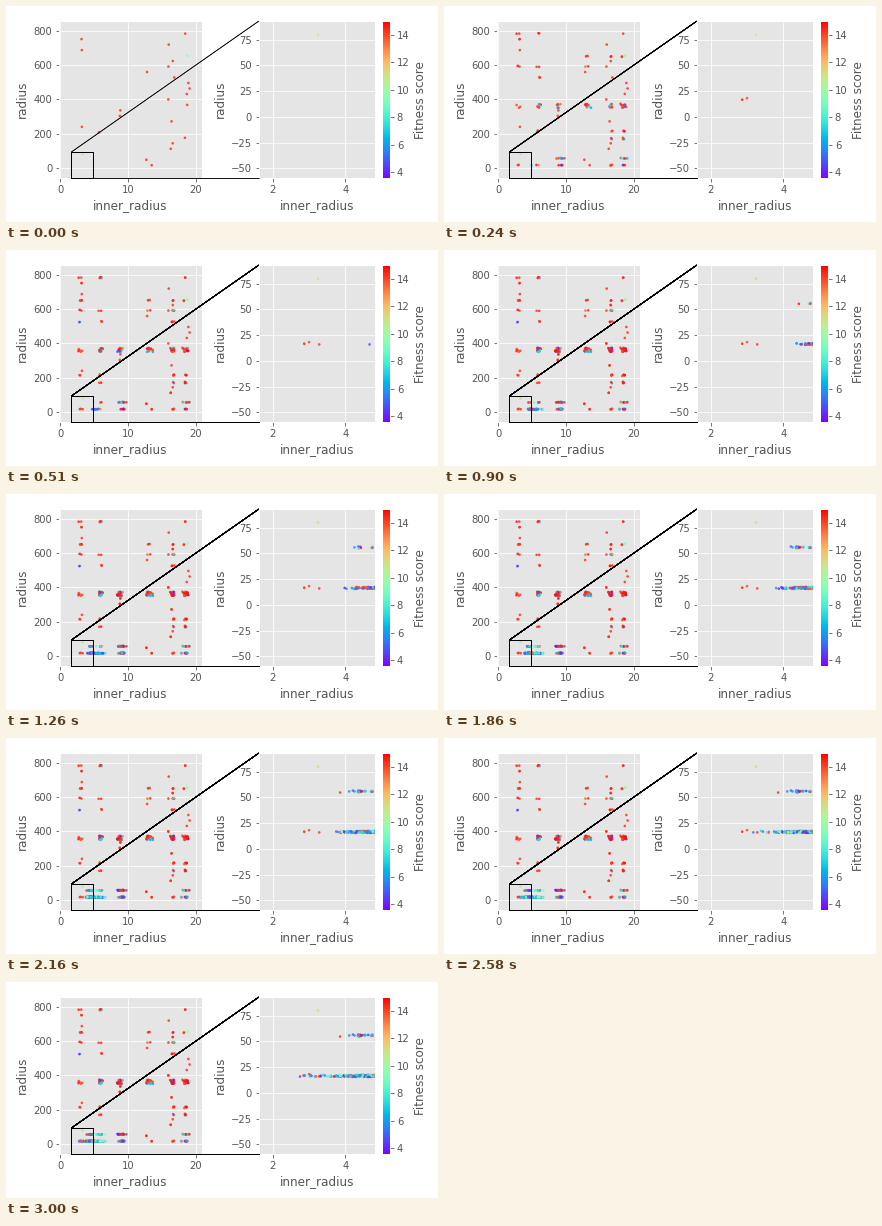
A matplotlib script for the animation above (3030 ms loop, 432 by 216 pixels).

```python
import numpy as np
import matplotlib.pyplot as plt
from matplotlib.animation import FuncAnimation
from matplotlib.cm import ScalarMappable
from matplotlib.collections import LineCollection
from matplotlib.colors import Normalize

plt.style.use("ggplot")
plt.rcParams["font.family"] = "DejaVu Sans"

W, H, DPI = 432, 216, 72
FRAMES, INTERVAL = 101, 30
TOP, BOTTOM = 15.1, 172.2
COLUMNS = [2.9, 5.9, 8.7, 13.1, 16.6, 18.5]
ROWS = [16, 56, 170, 215, 526, 590, 650, 782]

rng = np.random.default_rng(12)
norm = Normalize(3.57, 14.98)
births = []  # (frame, inner_radius, radius, fitness)


def add(t, x, y, fit):
    births.append((int(t), x, y, np.clip(fit, 3.8, 14.9)))


def mixed(low_share):
    if rng.random() < low_share:
        return rng.uniform(3.8, 8)
    return rng.normal(14.4, 0.4)


def front(t):
    """Smallest inner_radius reached on the lower row."""
    advance = max(0, (t - 55) / 45) ** 1.6
    return 3.85 + 0.03 * max(0, 42 - t) - 1.5 * advance


def first_generation():
    for y in np.linspace(16, 782, 25):
        x = rng.choice(COLUMNS) + rng.normal(0, 0.35)
        fit = rng.uniform(9, 12) if rng.random() < 0.08 else 14.4
        add(0, x, y, fit)
        if rng.random() < 0.6:
            add(rng.integers(2, 30), x, y, fit)


def crossovers():
    for _ in range(34):
        t = 1 + 22 * rng.random() ** 1.5
        x, y = rng.choice(COLUMNS), rng.choice(ROWS)
        for _ in range(2):
            add(t, x + rng.normal(0, 0.12), y + rng.normal(0, 2), mixed(0.08))


def clusters():
    for i, cx in enumerate(COLUMNS):
        for _ in range(5 if i == 0 else 20):
            t = 1 + 30 * rng.random() ** 1.6
            add(t, cx + rng.normal(0, 0.22), rng.uniform(349, 374), mixed(0.3))
    for cx, n in [(9, 24), (18.6, 8)]:
        for y in (16, 56):
            for _ in range(n):
                t = 3 + 45 * rng.random() ** 1.4
                add(t, cx + rng.normal(0, 0.35), y + rng.uniform(-1, 2), mixed(0.55))


def lower_rows():
    add(14, 3.28, 16, 14.3)
    add(10, 4.67, 16, 4.6)
    for t in range(8, 45):
        add(t, rng.uniform(4.85, 5 + t / 25), 16, rng.uniform(4, 7.5))
    for t in range(20, 95, 3):
        add(t, min(rng.normal(4.45, 0.2), 4.75), rng.uniform(54.5, 57), mixed(0.75))
    for t in range(18, FRAMES):
        edge = front(t)
        ripe = np.clip((t - 42) / 25, 0, 1)
        for _ in range(3):
            x = edge + (4.95 - edge) * rng.random() ** 0.7
            r = rng.random()
            if x < edge + 0.2 or r < 0.4 - 0.2 * ripe:
                fit = rng.uniform(3.8, 6)
            elif r < 0.6 + 0.25 * ripe:
                fit = rng.uniform(6, 8 + 1.8 * ripe)
            else:
                fit = rng.uniform(13, 14.8)
            add(t, x, rng.uniform(15.5, 17.5), fit)
        if t % 3 == 0:
            add(t, rng.uniform(4.85, 6.7), rng.choice([16, 16, 56]), rng.uniform(5, 10))


for breed in (first_generation, crossovers, clusters, lower_rows):
    breed()
births.sort(key=lambda b: b[0])
born, xs, ys, fits = np.array(births).T
offsets = np.column_stack([xs, ys])

fig = plt.figure(figsize=(W / DPI, H / DPI), dpi=DPI, facecolor="white")


def panel(left, right):
    return fig.add_axes([left / W, 1 - BOTTOM / H, (right - left) / W, (BOTTOM - TOP) / H])


def plot_panel(left, right, xlim, ylim, xticks, yticks):
    ax = panel(left, right)
    ax.set(xlim=xlim, ylim=ylim, xticks=xticks, yticks=yticks,
           xlabel="inner_radius", ylabel="radius")
    return ax


main = plot_panel(53.2, 195.8, (-0.19, 20.87), (-59.5, 855), [0, 10, 20], range(0, 801, 200))
zoom = plot_panel(252.8, 368.6, (1.61, 4.81), (-59.5, 93), [2, 4], range(-50, 76, 25))
dots = [ax.scatter([], [], s=7, c=[], cmap="rainbow", norm=norm, alpha=0.8,
                   linewidths=0, zorder=3) for ax in (main, zoom)]

bar = fig.colorbar(ScalarMappable(norm, "rainbow"), cax=panel(376.4, 383.8),
                   ticks=range(4, 15, 2))
bar.set_label("Fitness score")

# Zoom marker in stage pixels; the links darken as they are drawn again
overlay = fig.add_axes([0, 0, 1, 1])
overlay.set(xlim=(0, W), ylim=(0, H))
overlay.axis("off")


def corners(ax):
    """Lower-left and upper-right of the zoomed region as seen in ax."""
    region = np.column_stack([zoom.get_xlim(), zoom.get_ylim()])
    return overlay.transData.inverted().transform(ax.transData.transform(region))


(x0, y0), (x1, y1) = corners(main)
(zx, zy0), (_, zy1) = corners(zoom)
overlay.plot([x0, x1, x1, x0, x0], [y0, y0, y1, y1, y0], color="black", lw=1)
links = [[(x0, y1), (zx, zy1)], [(x0, y0), (zx, zy0)]]
connectors = LineCollection([], colors="black", linewidths=0.7)
overlay.add_collection(connectors, autolim=False)


def update(frame):
    n = np.searchsorted(born, frame, side="right")
    for d in dots:
        d.set_offsets(offsets[:n])
        d.set_array(fits[:n])
    connectors.set_segments(links * min(frame + 2, 25))
    return [*dots, connectors]


anim = FuncAnimation(fig, update, frames=FRAMES, interval=INTERVAL,
                     init_func=lambda: update(0), repeat=True, repeat_delay=0)
plt.show()
```
